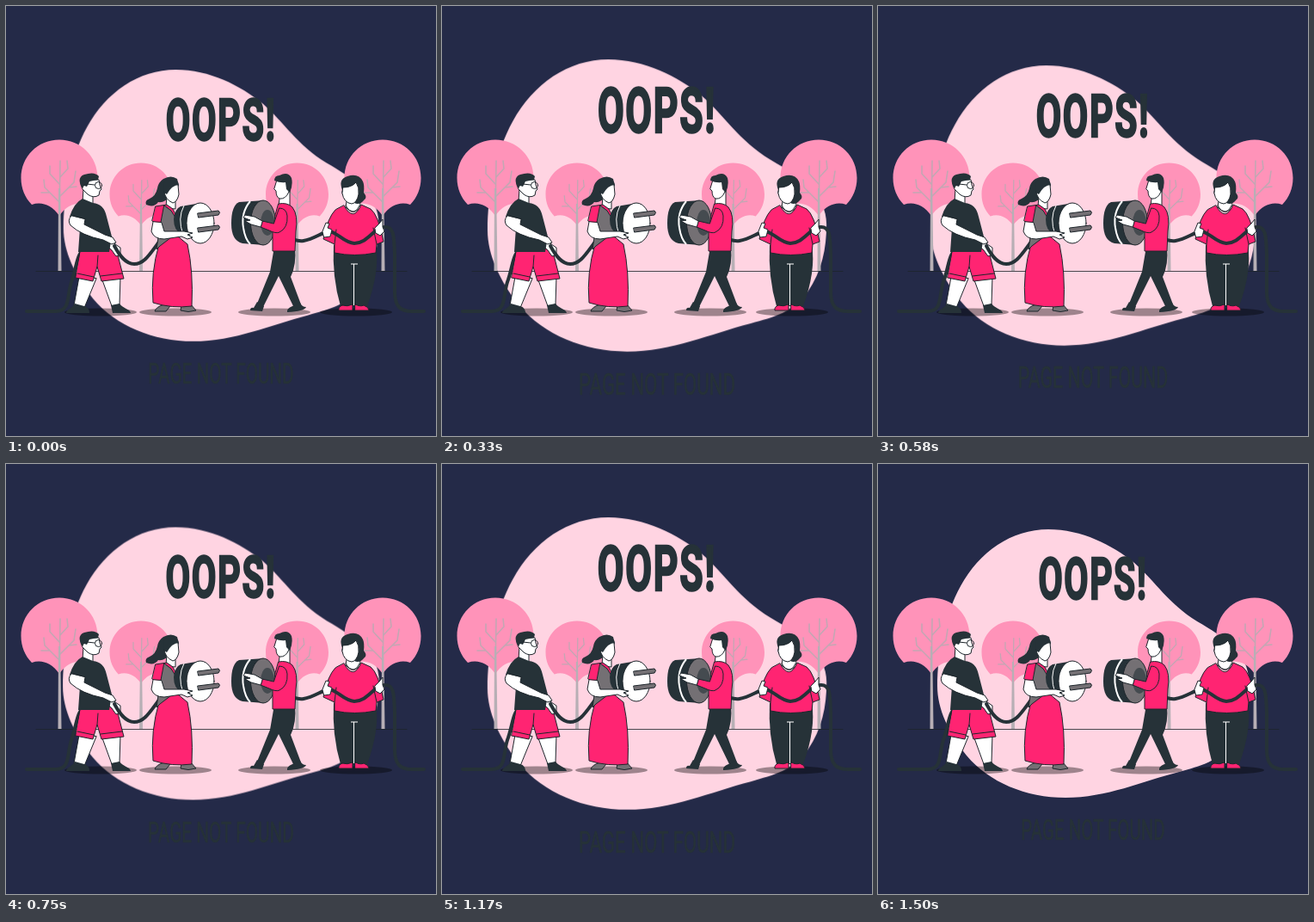
These frames come from a looping animation (500x500 px, 1.54 s). An HTML page:

```html
<!DOCTYPE html>
<html lang="en">
<head>
<meta charset="utf-8">
<title>Page not found</title>
<style>
  html, body { margin: 0; width: 100%; height: 100%; overflow: hidden; background: #242a48; }
  svg { display: block; width: 100%; height: 100%; }

  .beat { animation: beat 1540ms linear infinite; }
  .blob { fill: #ffd4e2; transform-origin: 250px 232px; }
  .title { fill: #263238; transform-origin: 250px 273.5px; }
  .title text {
    font-family: Roboto, "Liberation Sans", sans-serif;
    text-anchor: middle;
    stroke: #263238;
  }
  .oops { font-size: 66px; font-weight: 700; letter-spacing: 2.5px; stroke-width: 2.4px; }
  .note { font-size: 33px; stroke-width: .6px; }

  @keyframes beat {
    0%, 100% { transform: scale(1.012); }
    17.53% { transform: scale(1.1); }
    21.43% { transform: scale(1.089); }
    37.66% { transform: scale(1.044); }
    48.7% { transform: scale(1.016); }
    55.2% { transform: scale(1.011); }
    62.34% { transform: scale(1.024); }
    70.13% { transform: scale(1.06); }
    75.97% { transform: scale(1.089); }
    78.9% { transform: scale(1.098); }
    97.4% { transform: scale(1); }
  }

  .dark { fill: #263238; }
  .pink { fill: #ff2472; }
  .gray { fill: #747074; }
  .skin { fill: #fff; }
  .ink { stroke: #1d252b; stroke-width: 1; stroke-linejoin: round; stroke-linecap: round; }
  .line { fill: none; }
  .cord { fill: none; stroke: #263238; stroke-width: 4; stroke-linecap: round; }
  .shade { opacity: .38; }
  .crown { fill: #ff93b9; }
  .trunk { fill: #b7afb5; }
  .twig { fill: none; stroke: #c4a6b3; stroke-width: 1.6; stroke-linecap: round; }
</style>
</head>
<body>
<svg viewBox="0 0 500 500">
  <defs>
    <g id="tree">
      <path class="crown" d="M0-44.500C25-44.500 44.500-25 44.500 0C44.500 12 40 23 32 31C21 27 9 31 0 44C-9 31-21 27-32 31C-40 23-44.500 12-44.500 0C-44.500-25-25-44.500 0-44.500Z"/>
      <path class="twig" d="M0 42L1-20M0 28L-17 11L-18 2M0 22L17 5L19-8M0 7L-11-5L-11-14M1-1L10-11L9-20M-11 17L-21 17M11 11L20 10"/>
    </g>
  </defs>

  <rect width="500" height="500" fill="#242a48"/>

  <path class="blob beat" d="M198 76C237 76 272 94 298 115C323 137 337 162 371 183C404 202 431 221 431 252C431 278 426 302 411 324C396 346 375 351 350 358C307 369 266 388 218 388C172 388 129 370 103 339C82 312 69 285 69 258C69 222 77 176 96 142C118 102 155 76 198 76Z"/>

  <path class="ink line" d="M35 308.500H466" stroke-opacity=".8"/>

  <g id="trees">
    <use href="#tree" x="62" y="200"/>
    <use href="#tree" x="438" y="200"/>
    <use href="#tree" transform="translate(157 219) scale(.82)"/>
    <use href="#tree" transform="translate(338.500 219) scale(.82)"/>
    <path class="trunk" d="M61 212h2.200l1.300 96h-4zM437 212h2.200l1.300 96h-4zM156 230h2l1 78h-4zM337.500 230h2l1 78h-4z"/>
  </g>

  <g class="title beat">
    <g transform="translate(250 0) scale(.62 1)">
      <text class="oops" y="157">OOPS!</text>
      <text class="note" y="437">PAGE NOT FOUND</text>
    </g>
  </g>

  <g class="shade">
    <ellipse cx="110" cy="356" rx="42" ry="4.500"/>
    <ellipse cx="197" cy="356" rx="42" ry="4.500"/>
    <ellipse cx="312" cy="356" rx="42" ry="4.500"/>
    <ellipse cx="407" cy="356" rx="42" ry="4.500"/>
  </g>

  <!-- man in shorts -->
  <g>
    <path class="cord" d="M24 355H58C76 355 70 336 77 318C83 300 82 286 94 281"/>
    <path class="skin ink" d="M85 315L79 348L91 351L105 317ZM111 316L123 349L132 347L133 315Z"/>
    <path class="dark" d="M80 346C78 351 70 353 70 357H97C97 353 95 350 91 349ZM122 348L124 357H145C144 352 136 352 132 346Z"/>
    <path class="pink ink" d="M87 282H128L137 317L111 320L106 303L101 320L81 316Z"/>
    <path class="ink line" d="M83 311L102 315M110 314L135 311M106 303L107 290"/>
    <path class="skin ink" d="M90 212L89 228L101 231V221Z"/>
    <path class="skin ink" d="M91 202H108L109 208L111 213L109 215L108 220Q102 224 95 219L89 213Z"/>
    <path class="dark" d="M88 212Q82 199 91 196Q103 192 108 198L107 202L97 204L94 210L91 209Z"/>
    <circle class="ink line" cx="107.500" cy="208.500" r="4"/>
    <path class="ink line" d="M103 208L94 207"/>
    <path class="skin ink" d="M118 268L127 277L133 281V289L128 291L123 284L113 275Z"/>
    <path class="dark" d="M89 224L101 229Q114 230 117 245L123 268L120 286H84L86 258L74 245Q79 229 89 224Z"/>
    <path class="skin ink" d="M76 244Q71 249 75 255Q88 267 113 272L123 277L128 275L124 269L115 266L91 254L92 248Z"/>
  </g>

  <!-- woman with plug -->
  <g>
    <path class="cord" d="M126 279C132 290 139 300 149 300C168 300 173 270 203 250"/>
    <path class="gray ink" d="M184 347Q174 350 173 355H186L191 349ZM204 348L203 354Q212 357 221 354L214 346Z"/>
    <path class="dark" d="M183 201Q192 196 199 201L201 209L189 222Q185 229 177 228Q172 235 163 231Q161 226 167 224Q174 221 176 212Q177 205 183 201Z"/>
    <path class="skin ink" d="M187 219L186 235L197 236V226Z"/>
    <path class="skin ink" d="M188 208Q196 203 200 208L201 219Q199 228 194 229Q185 225 184 216Z"/>
    <path class="dark" d="M184 217Q181 203 190 200Q199 199 201 208Q193 208 187 219Z"/>
    <path class="pink ink" d="M174 233L187 231L194 236L199 246L200 268L211 277Q218 309 216 349Q193 352 171 345Q168 310 178 277L177 255L170 250Z"/>
    <path class="gray ink" d="M184 232L192 238L197 246L203 247L200 263L179 279L175 283L178 262Z"/>
    <path class="dark" d="M203 233L227 229V275L204 265Q195 261 195 248Q196 236 203 233Z"/>
    <path class="line" stroke="#fff" d="M207 232Q199 247 206 266"/>
    <ellipse class="skin ink" cx="226" cy="252.500" rx="16" ry="23.500"/>
    <path class="gray ink" d="M223 241L247 238Q250 240 247 243L224 246ZM223 258L247 255Q250 257 247 260L224 263Z"/>
    <path class="skin ink" d="M171 251L169 262Q172 271 184 271L204 268L211 271L217 269L211 266L217 264L207 262L184 262L181 252Z"/>
  </g>

  <!-- man with socket -->
  <g>
    <path class="dark" d="M312 280H336Q338 301 331 315L343 347L335 351L317 314L299 350L292 346L307 309Z"/>
    <path class="dark" d="M292 344L300 349L298 355L284 354Q284 350 288 351ZM333 349L342 345Q344 350 349 350Q347 355 327 356Q326 352 333 349Z"/>
    <path class="cord" d="M304 258C322 264 334 275 346 273C357 271 365 265 374 262"/>
    <path class="dark" d="M271 228L300 226V278L275 276Q262 273 262 253Q262 232 271 228Z"/>
    <ellipse class="gray ink" cx="299" cy="252" rx="14.500" ry="26"/>
    <path class="line" stroke="#fff" stroke-width="2" d="M284 227Q273 240 276 258Q278 271 284 277"/>
    <ellipse class="dark" cx="304" cy="252" rx="8" ry="15" opacity=".6"/>
    <path class="skin ink" d="M319 217L317 232L330 234V214Z"/>
    <path class="skin ink" d="M315 203Q322 199 328 204L329 216Q325 225 318 224Q314 222 314 215L312 213Z"/>
    <path class="dark" d="M312 203Q312 197 318 197Q328 192 332 200Q334 208 330 217L326 213L325 205Q319 206 312 203Z"/>
    <path class="pink ink" d="M317 230Q327 228 333 234Q340 243 337 262L336 285H310L310 263L313 243Z"/>
    <path class="pink ink" d="M318 235Q326 235 327 244Q328 258 318 263Q314 265 306 261L296 257L298 250L311 253Z"/>
    <path class="skin ink" d="M298 250L289 245L278 243L276 246L284 249L278 250L285 254L296 257Z"/>
  </g>

  <!-- person in sweater -->
  <g>
    <path class="dark" d="M381 278H430Q435 308 420 349H389Q379 315 381 278Z"/>
    <path class="line" stroke="#fff" d="M404.500 348V300M401 300H409"/>
    <path class="pink ink" d="M391 348Q397 350 403 347V354H387Q386 350 391 348ZM406 347Q412 350 416 348Q422 350 422 354H406Z"/>
    <path class="skin ink" d="M397 219L395 234Q404 244 412 234L411 219Z"/>
    <path class="dark" d="M391 214Q386 201 397 198Q410 194 415 204Q417 208 416 217Q421 223 416 226Q411 232 405 229L393 221Q389 218 391 214Z"/>
    <path class="skin ink" d="M392 211Q402 211 407 205Q411 211 410 219Q408 229 402 230Q393 229 391 218Z"/>
    <path class="pink ink" d="M393 232Q404 252 413 231L424 236Q433 243 439 274L431 277L430 287Q405 292 382 287V277L369 271Q374 246 383 237Z"/>
    <path class="ink line" d="M395 232Q404 247 411 232M384 260L382 277M427 258L431 277"/>
    <path class="cord" d="M371 264C382 257 390 275 405 276C421 276 427 258 440 257C452 256 451 270 452 288V332C452 350 459 355 472 355H486"/>
    <path class="skin ink" d="M368 262L372 252L376 253L374 258L379 260L377 268L370 269ZM429 258L434 253L438 248V257L440 262L435 267L430 264Z"/>
  </g>
</svg>
</body>
</html>
```
